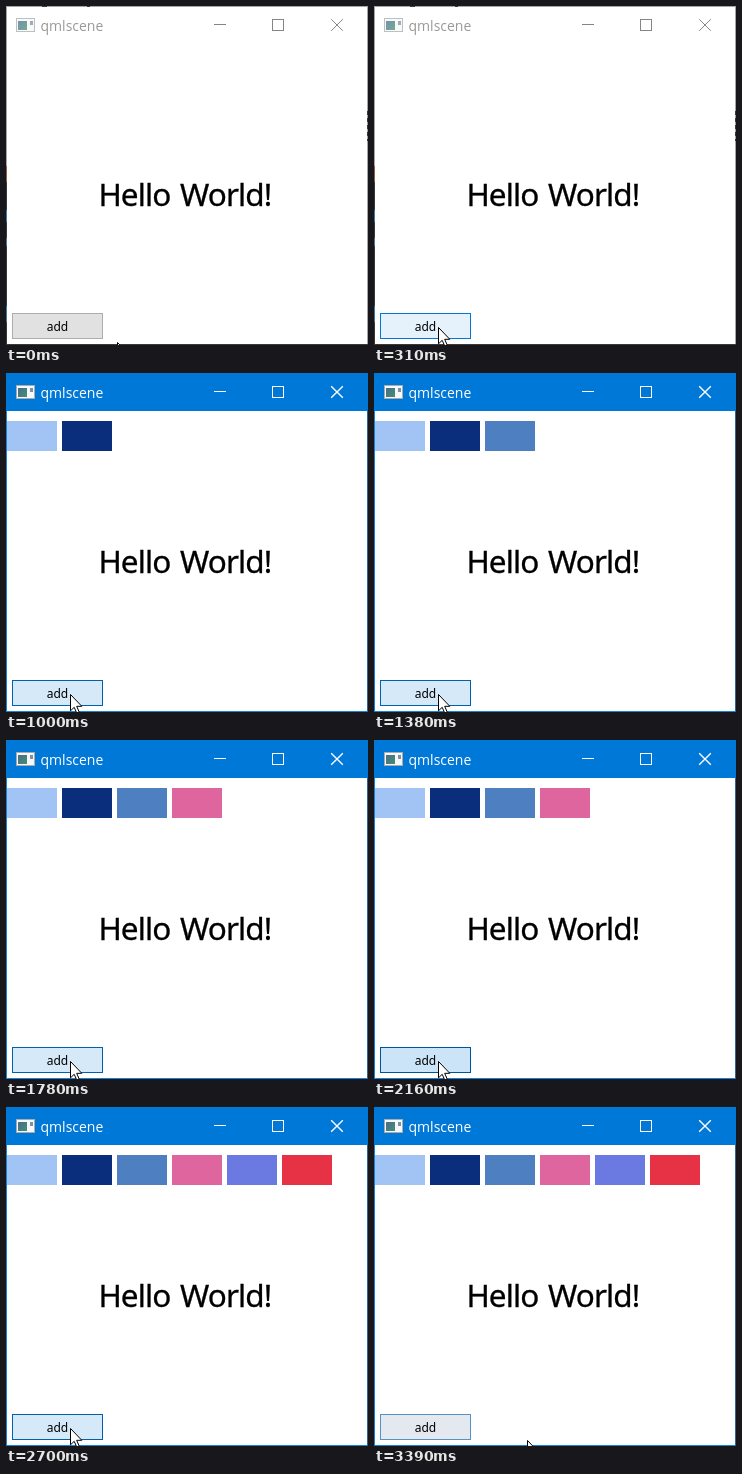
An HTML page for the animation above (3470 ms loop, 362x339 px).

```html
<!DOCTYPE html>
<html lang="en">
<head>
<meta charset="utf-8">
<title>qmlscene</title>
<style>
  html, body { margin: 0; width: 100%; height: 100%; overflow: hidden; background: #fff; }
  svg { display: block; width: 362px; height: 339px; }
  .title { font: 14px "Open Sans", sans-serif; fill: #999; }
  .hello { font: 31.5px "Noto Sans", sans-serif; letter-spacing: -.9px; stroke: #000; stroke-width: .3; }
  .label { font: 12px "Noto Sans", sans-serif; text-anchor: middle; }
  .bar { fill: #fff; }
  .controls { fill: none; stroke: #858585; }
  .icon { opacity: .75; }
  .active .title { fill: #fff; }
  .active .bar { fill: #0078d7; }
  .active .controls { stroke: #fff; }
  .active .close { stroke-width: 1.4; }
  .active .icon { opacity: 1; }
  .frame-on, .active .frame-off { display: none; }
  .active .frame-on { display: inline; }
</style>
</head>
<body>
<svg id="win" viewBox="0 0 362 339">
  <defs>
    <linearGradient id="screen" x2="1" y2="1">
      <stop offset="0" stop-color="#436f91"/>
      <stop offset="1" stop-color="#4b8b72"/>
    </linearGradient>
  </defs>
  <rect width="362" height="339" fill="#fff"/>
  <rect class="bar" width="362" height="38"/>

  <g class="frame-off" shape-rendering="crispEdges">
    <path d="M0 .5H362M.5 0V160M361.5 0V339" stroke="#a5a5a5"/>
    <path d="M36 .5h5M81 .5h3M.5 176V339M0 338.5H362" stroke="#393939"/>
    <path d="M361.5 105v30" stroke="#393939" stroke-dasharray="4 3"/>
    <path d="M.5 160v16" stroke="#9a5a38"/>
    <path d="M.5 204v12M.5 232v8M.5 300v16" stroke="#3f789f"/>
  </g>
  <g class="frame-on" shape-rendering="crispEdges">
    <path d="M.5 38V339M0 338.5H362" stroke="#1883d7"/>
    <path d="M361.5 38V339" stroke="#2b6799"/>
  </g>

  <g class="icon" shape-rendering="crispEdges">
    <rect x="10.5" y="12.5" width="18" height="13" fill="#f8f8f8" stroke="#a8acae"/>
    <rect x="12" y="15" width="9" height="9" fill="url(#screen)"/>
    <rect x="24" y="15" width="3" height="4" fill="#7894a4"/>
  </g>
  <text class="title" x="34.5" y="25">qmlscene</text>
  <g class="controls">
    <path d="M208 18.5h12"/>
    <rect x="266.5" y="13.5" width="11" height="11"/>
    <path class="close" d="M325.2 13.2l11.6 11.6M336.8 13.2l-11.6 11.6"/>
  </g>

  <g id="tiles" shape-rendering="crispEdges"></g>
  <text class="hello" y="200"><tspan x="92.4">Hello</tspan><tspan x="174">World!</tspan></text>

  <rect id="button" x="6.5" y="307.5" width="90" height="25"/>
  <text class="label" x="51.5" y="325">add</text>
  <path id="cursor" d="M.5.5V16.8L4.2 13.3 7 19.6 9.4 18.6 6.7 12.3H11.8Z" fill="#fff" stroke="#000"/>
</svg>
<script>
const LOOP = 3470, TICK = LOOP / 45, HOLD = 2 * TICK;
const clicks = [540, 1000, 1380, 1780, 2240, 2700];
const colors = ['#a1c4f4', '#0a2d7c', '#4e7fc1', '#de659e', '#6b7ae0', '#e63244'];
const entry = [111, 336], rest = [64, 321], exit = [153, 333];
const fills = [[225, 225, 225], [229, 241, 251], [204, 228, 247]];
const edges = [[173, 173, 173], [0, 120, 215], [0, 84, 153]];

const $ = id => document.getElementById(id);
const set = (el, attrs) => Object.entries(attrs).forEach(([k, v]) => el.setAttribute(k, v));
const ramp = (t, from, to) => Math.min(1, Math.max(0, (t - from) / (to - from)));
const easeOut = p => p * (2 - p);
const smooth = p => p * p * (3 - 2 * p);
const lerp = (a, b, p) => a.map((v, i) => Math.round(v + (b[i] - v) * p));

const tiles = colors.map((fill, i) => {
  const el = document.createElementNS('http://www.w3.org/2000/svg', 'rect');
  set(el, { x: 1 + 55 * i, y: 48, width: 50, height: 30, fill });
  $('tiles').append(el);
  return el;
});

function cursorAt(t) {
  return t < LOOP / 2
    ? lerp(entry, rest, easeOut(ramp(t, 0, 4 * TICK)))
    : lerp(rest, exit, smooth(ramp(t, 39 * TICK, 44 * TICK)));
}

// 0 normal, 1 hover, 2 pressed
function buttonLevel(t) {
  const hover = ramp(t, TICK, 4 * TICK) - ramp(t, 41 * TICK, 47 * TICK);
  const next = clicks.find(c => c > t + TICK / 4);
  if (next - t < HOLD + TICK / 4) return next - t > 1.5 * TICK ? 1.5 : 2;
  const last = clicks.filter(c => c <= t + TICK / 4).pop();
  const fade = last ? .65 * .3 ** Math.floor((t - last) / HOLD + .1) : 0;
  return hover + fade * hover;
}

function mix(stops, level) {
  const i = level < 1 ? 0 : 1;
  return `rgb(${lerp(stops[i], stops[i + 1], level - i)})`;
}

const start = performance.now();
function draw() {
  const now = (performance.now() - start) % LOOP;
  const t = Math.floor((now + 8) / TICK) * TICK;
  const level = buttonLevel(t);
  $('win').classList.toggle('active', t >= 5 * TICK);
  set($('button'), { fill: mix(fills, level), stroke: mix(edges, level) });
  set($('cursor'), { transform: `translate(${cursorAt(t)})` });
  tiles.forEach((el, i) => set(el, { visibility: now >= clicks[i] ? 'visible' : 'hidden' }));
  requestAnimationFrame(draw);
}
draw();
</script>
</body>
</html>
```
